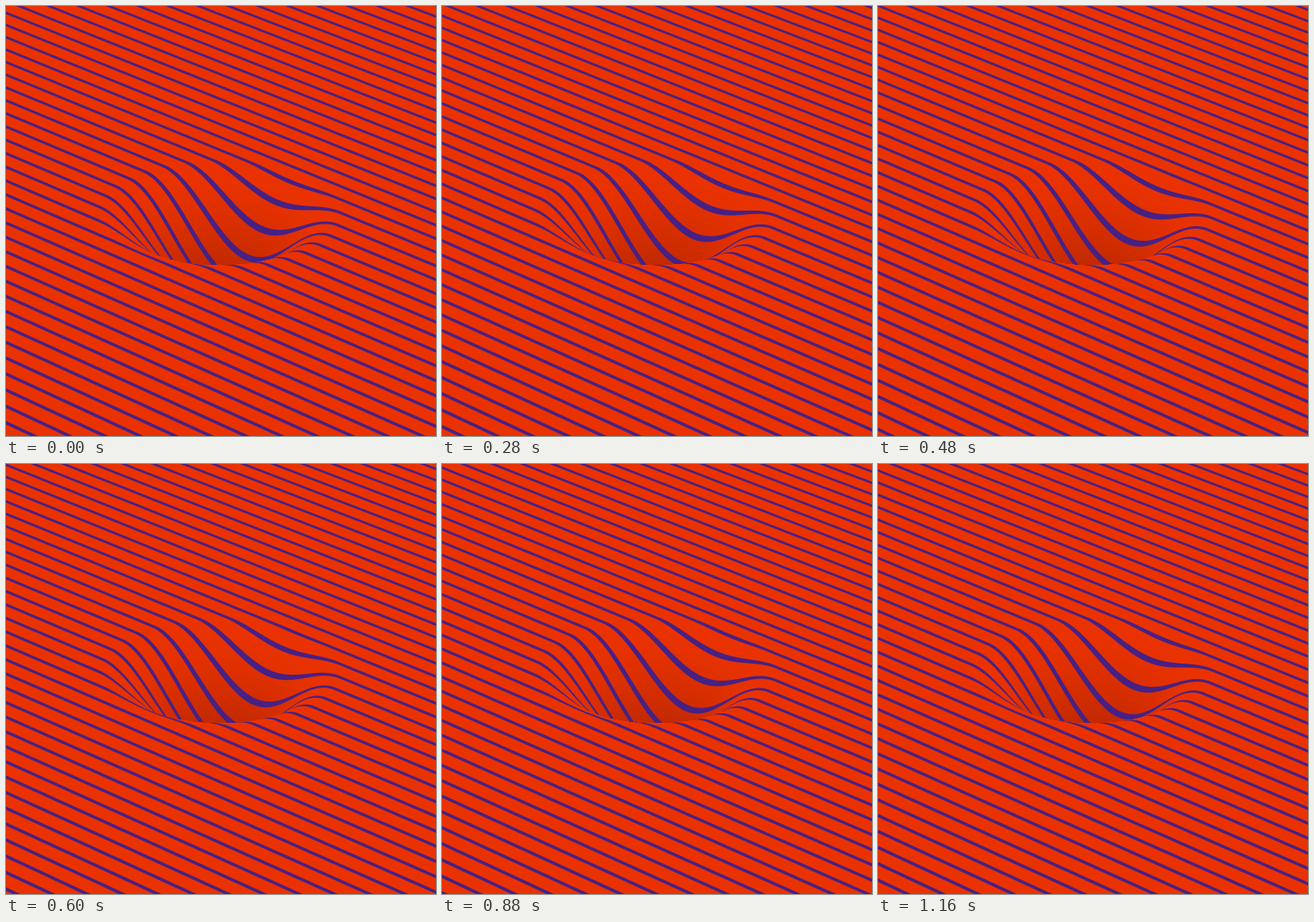
An HTML page with a canvas for the animation above (1200 ms loop, 500 by 500 pixels).

```html
<!DOCTYPE html>
<html>
<head>
<meta charset="utf-8">
<style>
html, body { margin: 0; height: 100%; overflow: hidden; background: #ea3200; }
canvas { display: block; width: 100vw; height: 100vh; }
</style>
</head>
<body>
<canvas id="stage" width="500" height="500"></canvas>
<script>
const SIZE = 500, LOOP = 1200, STEP = 40;
const RED = [234, 50, 0], PURPLE = [70, 33, 132];
const DUTY = 0.21, GAP = 16, SLOPE = 0.422, PERSPECTIVE = 0.00033, OFFSET = 3.275;
const HOLE = { x: 248.5, y: 242.5, radius: 141, squash: 0.45, depth: 88 };

const ctx = document.getElementById('stage').getContext('2d');
const image = ctx.createImageData(SIZE, SIZE);
image.data.fill(255);

// How far the surface sinks at a point of the flat plane
function sink(x, y) {
  const r = Math.hypot(x - HOLE.x, (y - HOLE.y) / HOLE.squash) / HOLE.radius;
  return r < 1 ? HOLE.depth * (1 + Math.cos(Math.PI * r)) / 2 : 0;
}

// Stripe number on the flat plane
function stripe(x, y) {
  const c = SIZE / 2;
  return (y - c - SLOPE * (x - c)) / (1 + PERSPECTIVE * (y - c)) / GAP + OFFSET;
}

// Nearest plane point that appears at screen position (x, y)
function planeY(x, y) {
  let near = y;
  if (sink(x, near) === 0) return near;
  while (near + sink(x, near) > y) near -= 0.25;
  let far = near + 0.25;
  for (let i = 0; i < 10; i++) {
    const mid = (near + far) / 2;
    if (mid + sink(x, mid) > y) far = mid; else near = mid;
  }
  return near;
}

const phase = new Float32Array(SIZE * SIZE);
const blur = new Float32Array(SIZE * SIZE);
const shade = new Float32Array(SIZE * SIZE);

for (let row = 0, i = 0; row < SIZE; row++) {
  for (let col = 0; col < SIZE; col++, i++) {
    const x = col + 0.5, y = row + 0.5, b = planeY(x, y), e = 0.5;
    const slopeX = sink(x + e, b) - sink(x - e, b);
    const stretch = Math.max(0.05, Math.abs(1 + sink(x, b + e) - sink(x, b - e)));
    const across = stripe(x + e, b) - stripe(x - e, b);
    const down = (stripe(x, b + e) - stripe(x, b - e)) / stretch;
    phase[i] = stripe(x, b) + DUTY / 2;
    blur[i] = Math.hypot(across - down * slopeX, down);
    shade[i] = 1 - 0.22 * (sink(x, b) / HOLE.depth) ** 1.5;
  }
}

// Integral of the stripe pattern, for smooth edges
function filled(u) {
  const whole = Math.floor(u);
  return whole * DUTY + Math.min(u - whole, DUTY);
}

function draw(progress) {
  const px = image.data;
  for (let i = 0; i < phase.length; i++) {
    const u = phase[i] - progress, half = blur[i] / 2;
    const ink = (filled(u + half) - filled(u - half)) / blur[i];
    for (let k = 0; k < 3; k++) {
      const ground = RED[k] * shade[i];
      px[i * 4 + k] = ground + (PURPLE[k] - ground) * ink;
    }
  }
  ctx.putImageData(image, 0, 0);
}

const start = performance.now();
let last = -1;
function tick() {
  const t = Math.max(0, performance.now() - start) % LOOP;
  const step = Math.floor(t / STEP);
  if (step !== last) draw(step * STEP / LOOP);
  last = step;
  requestAnimationFrame(tick);
}
tick();
</script>
</body>
</html>
```
